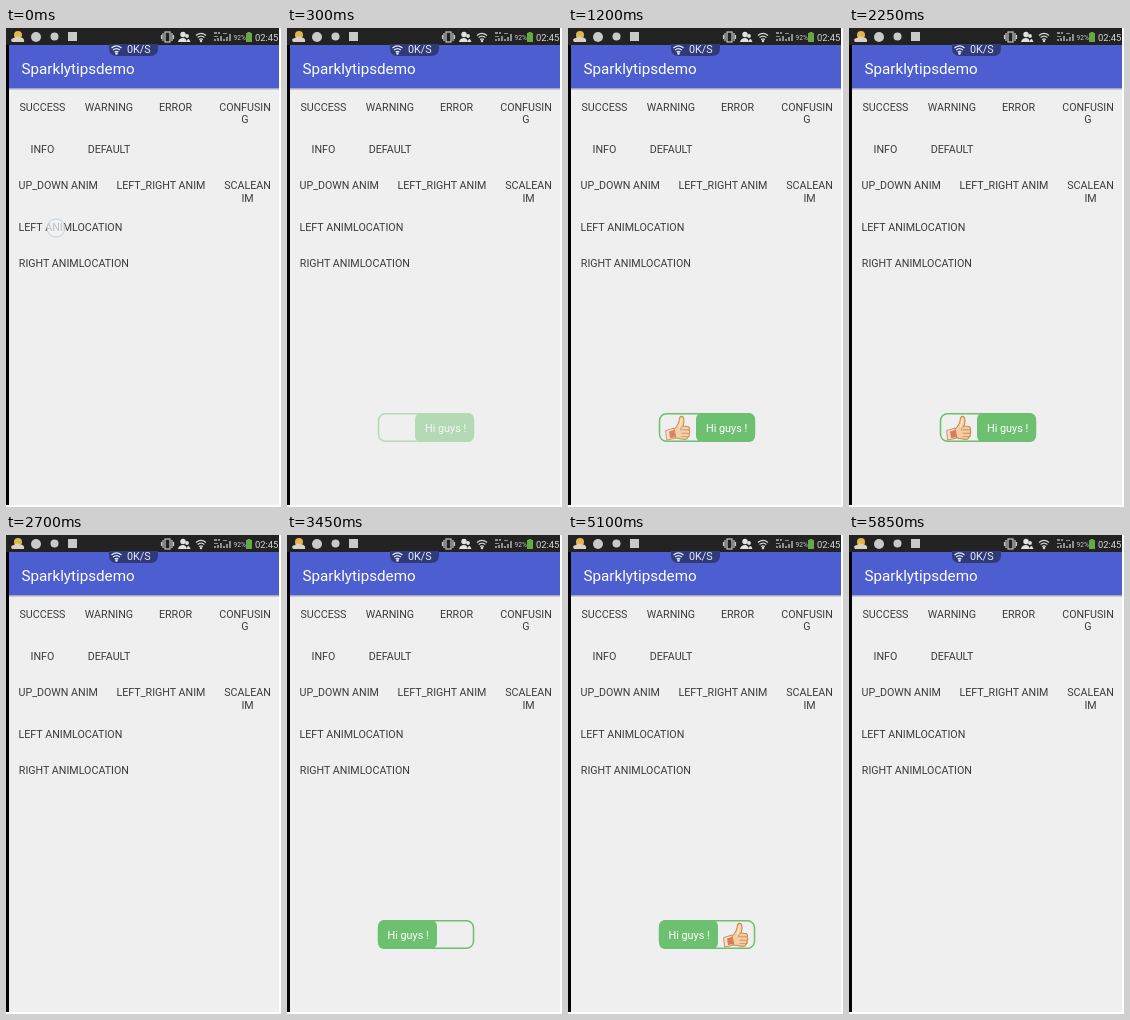
Animation of 275 by 479 pixels, one loop 6150 ms. Source, as an HTML page:

```html
<!DOCTYPE html>
<html lang="en">
<head>
<meta charset="utf-8">
<title>Toast demo</title>
<style>
  html, body { margin: 0; width: 100%; height: 100%; overflow: hidden; background: #efefef; }
  svg { display: block; width: 275px; height: 479px; }
  text { font-family: Roboto, sans-serif; }
  #labels text { font-size: 10.7px; fill: #3b3b3b; }
</style>
</head>
<body>
<svg viewBox="0 0 275 479">
  <defs>
    <g id="wifi" fill="none" stroke="currentColor" stroke-width="1.3">
      <path d="M-5-2.6Q0-6.6 5-2.6M-3.4-.4Q0-3.2 3.4-.4M-1.8 1.6Q0 .3 1.8 1.6"/>
      <circle cy="3" r=".6" fill="currentColor"/>
    </g>
    <g id="thumb" stroke-linejoin="round" stroke-linecap="round">
      <path d="M1 15.5 9 13 11 23 2 25Z" fill="#f4e0cc" stroke="#d08f5c" stroke-width="1"/>
      <path d="M4 16.5 9 15 10.5 22.3 5 23Z" fill="#dc7a55"/>
      <path d="M9 14Q14 10 14.5 3Q16 .2 18.3 2.2Q19.8 5.5 18 11L23 11.5Q25.5 13 24 15Q25.6 17 24 18.6Q25 21 23 22Q22.5 24.4 19.5 24.5L11 23Z"
        fill="#f5cda3" stroke="#cc8850" stroke-width="1.1"/>
      <path d="M17 14.8H24M17 18.3H24M17 21.7H23M18 11Q15 12 15.5 15" fill="none" stroke="#c9844c" stroke-width=".8"/>
      <path d="M16.2 4.5Q16.4 8 14.5 12" fill="none" stroke="#fde8cf" stroke-width="1.3"/>
    </g>
  </defs>

  <rect width="275" height="479" fill="#efefef"/>
  <rect y="61" width="275" height="1" fill="#c9cad2"/>
  <rect y="60" width="275" height="1" fill="#a3a7c4"/>
  <rect y="17" width="275" height="43" fill="#4d5ed0"/>
  <rect width="275" height="17" fill="#222"/>
  <rect y="17" width="3" height="462" fill="#020202"/>
  <path d="M273 0H275V479H0V477H273Z" fill="#fff"/>
  <path d="M103 16H152V20Q152 28 144 28H111Q103 28 103 20Z" fill="#303a76"/>
  <use href="#wifi" x="110.500" y="22.500" color="#e6ebff"/>
  <text x="121" y="25.300" font-size="10.800" fill="#e6ebff">0K/S</text>
  <text x="15.500" y="45.500" font-size="15.200" fill="#fff">Sparklytipsdemo</text>

  <g id="status" fill="#c9c9c9">
    <circle cx="12" cy="7" r="4" fill="#e3b64c"/>
    <path d="M6 14Q3.500 10.500 8 10Q11 7.500 14 9.500Q19 9.500 18 14Z" fill="#d8d3c4"/>
    <circle cx="30" cy="9" r="5"/>
    <circle cx="48.500" cy="8.500" r="4"/>
    <rect x="62" y="4" width="9" height="9"/>
    <g fill="none" stroke="#c9c9c9" stroke-width="1.200">
      <rect x="159" y="4" width="5" height="10"/>
      <path d="M157 5V13M166 5V13M155.500 7V11M167.500 7V11"/>
    </g>
    <g fill="#e2e2e2">
      <circle cx="177" cy="6.500" r="2.700"/>
      <path d="M172 14Q173 10 177 10Q180 10 181 14Z"/>
      <circle cx="181" cy="8" r="1.900"/>
      <path d="M181 14Q180.500 11 183 11L184.500 14Z"/>
    </g>
    <use href="#wifi" x="195" y="10" color="#d5d5d5"/>
    <path d="M208 4H211V6H208ZM212 4H214V6H212ZM208 8H212V9H208ZM208 11H210V13H208ZM211 10H213V13H211ZM214 8H216V13H214ZM217 11H219V13H217ZM220 9H222V13H220ZM223 6H225V13H223ZM217 5H221V6H217Z" fill="#8f8f8f"/>
    <text x="227.500" y="11.500" font-size="6.600">92%</text>
    <path d="M241.500 4H244.500V5H246V14H240V5H241.500Z" fill="#65a943"/>
    <text x="249" y="12.700" font-size="9.400" fill="#d9d9d9">02:45</text>
  </g>

  <g id="labels"></g>
  <circle id="touch" r="9" fill="#f0f2f4" fill-opacity=".72" stroke="#c5d2dd" stroke-width="1"/>

  <g id="toast">
    <rect x="91.500" y="385.700" width="95" height="27.600" rx="7" fill="#efefef" stroke="#6ec071" stroke-width="1.500"/>
    <rect id="panel" y="385" width="59" height="29" rx="6" fill="#6ec071"/>
    <text id="message" y="404" font-size="10.800" fill="#fff">Hi guys !</text>
    <use id="icon" href="#thumb" y="387"/>
  </g>
</svg>
<script>
const LOOP = 6150, HALF = 3000;
const $ = id => document.getElementById(id);

const labels = [
  ["SUCCESS", 36.5, 83], ["WARNING", 103, 83], ["ERROR", 169.5, 83],
  ["CONFUSIN", 239, 83], ["G", 239, 95],
  ["INFO", 36.5, 125], ["DEFAULT", 103, 125],
  ["UP_DOWN ANIM", 52.2, 161], ["LEFT_RIGHT ANIM", 155, 161],
  ["SCALEAN", 241.5, 161], ["IM", 241.5, 174],
  ["LEFT ANIMLOCATION", 64.4, 203], ["RIGHT ANIMLOCATION", 67.9, 239]
];
for (const [word, x, y] of labels) {
  const node = document.createElementNS("http://www.w3.org/2000/svg", "text");
  node.setAttribute("x", x);
  node.setAttribute("y", y);
  node.setAttribute("text-anchor", "middle");
  node.textContent = word;
  $("labels").append(node);
}

const sides = [
  { touch: [50, 200], panel: 128, message: 138, icon: 97, press: 0, hide: 2700 },
  { touch: [77, 236], panel: 91, message: 100.5, icon: 155, press: 150, hide: 2850 }
];

// Each step is [start, opacity], measured from the start of its half.
const toastSteps = [[0, 0], [300, .45], [450, 1]];
const iconSteps = [[0, 0], [600, .02], [750, .2], [900, .5], [1050, .78],
  [1200, .92], [1350, .95], [1500, .98], [1650, 1]];
const stepAt = (steps, t) => steps.findLast(([start]) => t >= start)[1];
const set = (id, name, value) => $(id).setAttribute(name, value);

function draw(time) {
  const t = time % LOOP;
  const second = t >= HALF;
  const side = sides[+second];
  const local = second ? t - HALF : t;

  set("touch", "cx", side.touch[0]);
  set("touch", "cy", side.touch[1]);
  set("touch", "opacity", +(local >= side.press && local < 300));
  set("toast", "opacity", local < side.hide ? stepAt(toastSteps, local) : 0);
  set("icon", "opacity", stepAt(iconSteps, local));
  for (const part of ["panel", "message", "icon"]) set(part, "x", side[part]);
}

const origin = performance.now();
function tick() {
  draw(performance.now() - origin);
  requestAnimationFrame(tick);
}
tick();
</script>
</body>
</html>
```
